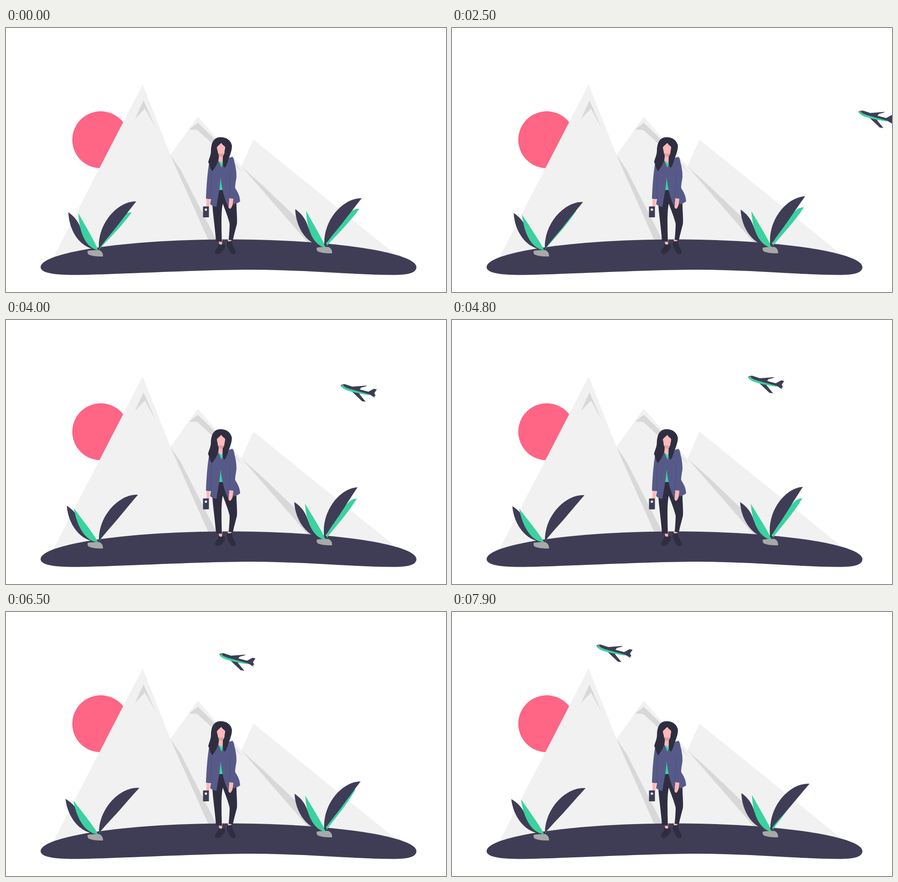
An HTML page for the animation above (8000 ms loop, 966x580 px).

```html
<!DOCTYPE html>
<html lang="en">
<head>
<meta charset="utf-8">
<title>Mountain walk</title>
<style>
html, body { margin: 0; width: 100%; height: 100%; overflow: hidden; background: #fff; }
svg { display: block; width: 100%; height: 100%; }
.hill { fill: #f1f1f1; }
.shade { fill: #d8d8d8; }
.navy { fill: #3f3d56; }
.ink { fill: #2f2e41; }
.green { fill: #3ad29f; }
.skin { fill: #ffb8b8; }
.coat { fill: #575a89; }
.stone { fill: #a8a8a8; }
</style>
</head>
<body>
<svg viewBox="0 0 966 580">
  <circle cx="208" cy="245.5" r="62.5" fill="#ff6584"/>

  <g class="hill">
    <path d="M543 245L517 304L500 500H858Z"/>
    <path d="M421 195L361 279L430 480H670L517 304Z"/>
    <path d="M300 124L105 502H449Z"/>
  </g>
  <g class="shade">
    <path d="M302 159L283 200L305 177L328 219Z"/>
    <path d="M361 279L383 311L463 468H445Z"/>
    <path d="M421 208L402 223L420 224L470 270L519 317L460 246Z"/>
    <path d="M517 304L568 350L636 415L676 474H665Z"/>
  </g>

  <path class="navy" d="M76 525.500C76 493 262 464.500 489 464.500C716 464.500 901 493 901 525.500C901 539 880 542.500 850 542.500C760 542 650 531 540 531C420 531 230 542 150 542.500C110 542.500 76 539 76 525.500Z"/>

  <g id="plants"></g>

  <g id="woman">
    <path class="skin" d="M467 464H475L474 476H468ZM487 462H496L495 470H487Z"/>
    <path class="ink" d="M466 355H477L506 386C506 402 508 418 507 430C504 443 500 455 498 467L489 465C490 452 491 440 491 430C488 417 482 402 476 386C472 400 473 440 474 470L461 468C459 440 455 415 453 388Z"/>
    <path class="ink" d="M467 474C471 477 475 476 479 474C482 479 482 484 477 488C473 494 468 498 462 496C458 495 458 490 461 486C465 482 466 478 467 474ZM486 468C489 469 493 469 496 467C496 476 500 482 504 489C506 494 503 498 498 497C491 495 490 489 488 484C484 479 484 473 486 468Z"/>
    <path class="skin" d="M440 374L448 375C447 384 448 391 445 396L440 395ZM490 373H499C499 384 498 391 493 397C488 397 488 393 489 387Z"/>
    <rect class="navy" x="432.5" y="392" width="13" height="24" rx="1"/>
    <circle cx="438.8" cy="399" r="2.6" fill="#fff"/>
    <path class="green" d="M465 290H480L477 356H465Z"/>
    <path class="coat" d="M447 291L466 290L473 307L480 288L497 283C500 285 501 291 502 297C505 308 506 317 506 327C505 336 503 343 503 351C506 358 513 364 514 381C509 385 504 386 499 388L499 375L490 374L488 392C480 378 474 354 471 328C470 352 465 372 462 393C457 392 453 391 448 387L450 376L439 375C440 348 442 317 447 291Z"/>
    <path d="M492 318L490 373M451 318L449 376" fill="none" stroke="#4a4c78" stroke-width=".8"/>
    <path class="skin" d="M466 270H478V288L473 297L466 291Z"/>
    <path d="M466 275H478V280C474 284 469 283 466 280Z" fill="#dfa0a4"/>
    <g id="hair">
      <path class="ink" d="M470 240C484 239 494 247 496 259C496 268 493 276 490 284C487 291 486 302 480 307C475 303 476 291 476 282C482 275 481 262 473 253C464 261 463 269 467 279C469 291 461 304 453 315C447 309 448 300 444 295C446 286 450 279 450 270C450 253 456 240 470 240Z"/>
    </g>
    <path class="skin" d="M472 253C476 257 479 259 481 261C481.500 269 478 276 473 276.500C467 276.500 463.500 270 463 262C465 259 468 257 472 253Z"/>
  </g>

  <g id="plane">
    <path class="navy" d="M819 164C821 162 826 161 830 162L845 167L877 164.500L874 166.500L864 169L861 173L880 178L892 171.500L898.500 173L893 181L896 187.500L893 187L894 191L884 185L862 180L860 183L874 200L866 199L844 178L825 170Z"/>
    <path class="green" d="M819 164.500C823 164 826 166 830 168.500C840 173 851 175 861 178L883 184L881 185.500C868 184 855 181 843 178C834 176 821 171 819 164.500Z"/>
    <path d="M822 163.700L826 164.500" stroke="#fff" stroke-width=".8"/>
  </g>
</svg>

<script>
const LOOP = 8;
const PIVOT = '203 487';
const $ = id => document.getElementById(id);

// Piecewise linear value through [time, value] points.
const keys = (...points) => t => {
  let i = 1;
  while (i < points.length - 1 && t > points[i][0]) i++;
  const [t0, a] = points[i - 1], [t1, b] = points[i];
  return a + (b - a) * (t - t0) / (t1 - t0);
};
// Eased swing from 0 to an angle and back.
const swing = (angle, half) => t => angle * (1 - Math.cos(Math.PI * t / half)) / 2;

// Colour, outline, left plant motion, right plant offset and motion.
const leaves = [
  ['navy', 'M137 405C138 445 163 486 203 487C190 481 176 468 166 446C160 426 151 415 137 405Z',
    swing(-5, 8), [498, -7], keys([0, 0], [5.4, -2], [7.9, .2])],
  ['green', 'M159 407C160 440 171 482 202 488C197 473 178 441 159 407Z',
    swing(-9, 5.5), [500, -5], keys([0, 0], [5.4, -2.4], [7.9, -.3])],
  ['green', 'M276 405C267 405 262 407 256 413C224 440 206 460 204 487C222 466 250 441 276 405Z',
    swing(-5.5, 5.5), [500, -8], keys([0, 0], [5.7, -5.4], [8, -6.5])],
  ['navy', 'M286 381C245 380 200 430 204 486C218 466 230 453 244 435C258 417 270 401 286 381Z',
    swing(4, 8), [495, -7], keys([0, 0], [4.75, -5.7], [7.9, 2.2])]
];
const stone = 'M179 490C184 488 197 488 205 488C211 491 213 495 213 502C203 502 191 502 182 498C179 496 179 493 179 490Z';

const addPath = (cls, d) => {
  const path = document.createElementNS('http://www.w3.org/2000/svg', 'path');
  path.setAttribute('class', cls);
  path.setAttribute('d', d);
  return $('plants').appendChild(path);
};

const moving = [];
for (const right of [false, true]) {
  for (const [cls, d, leftTurn, offset, rightTurn] of leaves) {
    moving.push({
      path: addPath(cls, d),
      shift: right ? offset : [0, 0],
      turn: right ? rightTurn : leftTurn
    });
  }
  addPath('stone', stone).setAttribute('transform', right ? 'translate(503 -7)' : '');
}

const hairTurn = keys([0, 0], [4.8, .8], [6.2, 0], [8, 0]);

function draw(now) {
  const t = now / 1000 % LOOP;
  for (const { path, shift, turn } of moving) {
    path.setAttribute('transform', `translate(${shift}) rotate(${turn(t)} ${PIVOT})`);
  }
  $('hair').setAttribute('transform', `rotate(${hairTurn(t)} 471 250)`);

  const u = t - 3.2;
  const x = -105 * u - .38 * u * u;
  const y = -27.1 * u + 1.69 * u * u;
  $('plane').setAttribute('transform', `translate(${x} ${y})`);
  requestAnimationFrame(draw);
}
draw(performance.now());
</script>
</body>
</html>
```
